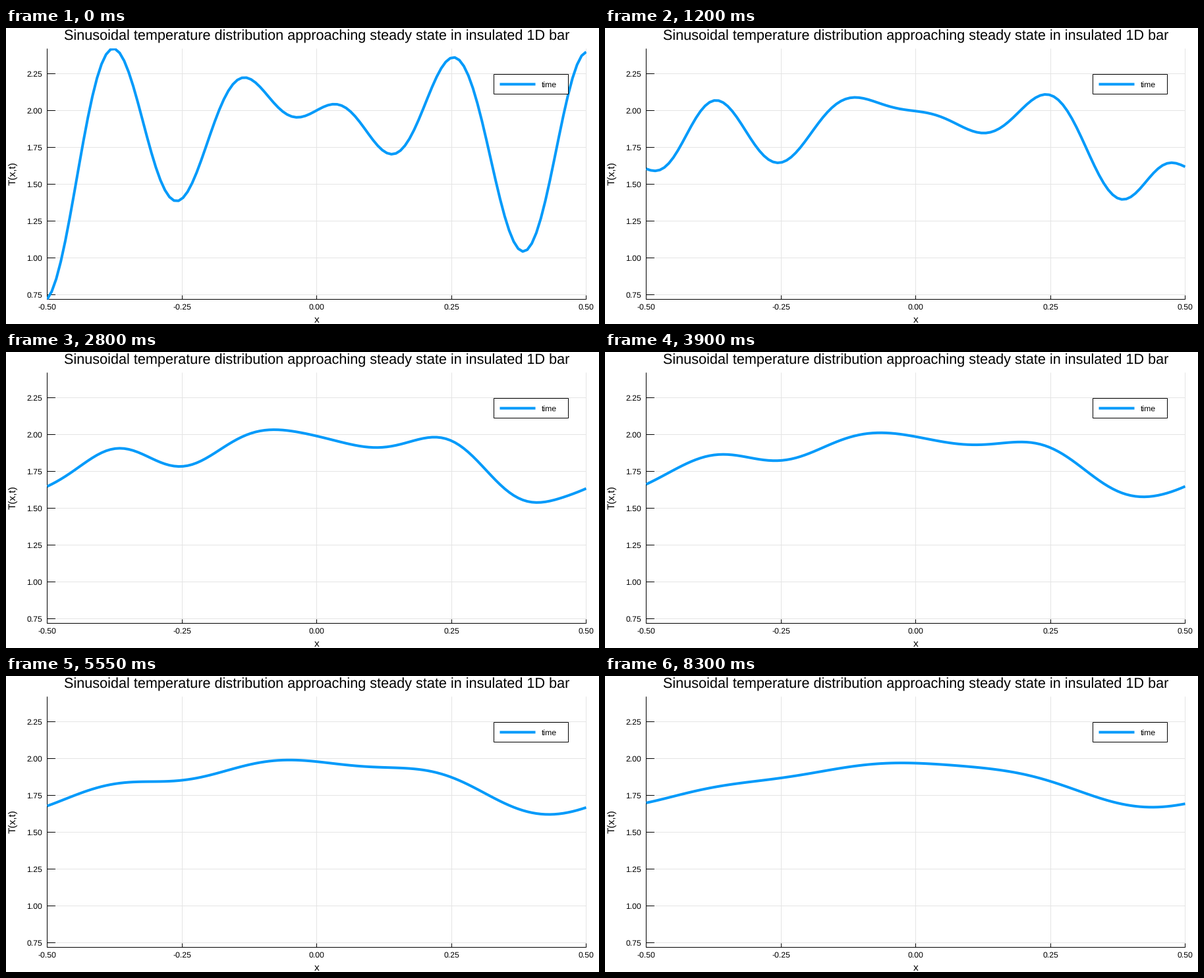
Write a matplotlib script that moves like this. It is 900 px wide and 450 px high and loops after 8.35 s.

```python
import matplotlib.pyplot as plt
import numpy as np
from matplotlib.animation import FuncAnimation
from matplotlib.patches import Rectangle

W, H = 900, 450
LEFT, RIGHT, TOP, BOTTOM = 62.5, 880.5, 31.4, 412.2
FRAMES, INTERVAL = 167, 50
BLUE = "#009afa"
N = 120              # grid points on the bar
STEP = 5e-5          # diffusivity times time per frame

plt.rcParams.update({
    "font.family": "Liberation Sans",
    "text.hinting": "none",
    "toolbar": "None",
})

# Periodic heat equation, solved mode by mode
x = np.linspace(-0.5, 0.5, N)
dx = x[1] - x[0]
start = 2 * np.exp(-x**2) + np.sin(2 * x) * np.cos(25 * x)
modes = np.fft.rfft(start)
rates = (2 * np.sin(np.pi * np.arange(len(modes)) / N) / dx) ** 2


def temperature(frame):
    return np.fft.irfft(modes * np.exp(-rates * STEP * frame), N)


def to_x(v):
    return LEFT + (v + 0.5) * (RIGHT - LEFT)


def to_y(v):
    return 69.3 + (2.25 - v) * 223.87


def crisp(v):
    return np.floor(v) + 0.5


fig = plt.figure(figsize=(W / 72, H / 72), dpi=72, facecolor="white")
ax = fig.add_axes([0, 0, 1, 1])
ax.set_xlim(0, W)
ax.set_ylim(H, 0)
ax.axis("off")


def rule(x0, y0, x1, y1, color="black", width=1, z=2):
    ax.plot([x0, x1], [y0, y1], color=color, lw=width, zorder=z,
            solid_capstyle="butt", snap=False)


def label(px, py, text, size, ha="center", **kw):
    ax.text(px, py, text, fontsize=size, ha=ha, va="baseline", zorder=6, **kw)


base = crisp(BOTTOM)
for v in np.arange(-0.5, 0.51, 0.25):
    px = crisp(to_x(v))
    rule(px, TOP, px, base, "#e4e4e4", z=1)
    rule(px, base, px, base - 6)
    label(to_x(v), 428.2, f"{v:.2f}", 12.3, parse_math=False)

for v in np.arange(0.75, 2.3, 0.25):
    py = crisp(to_y(v))
    rule(LEFT, py, RIGHT, py, "#e4e4e4", z=1)
    rule(LEFT, py, LEFT + 12.5, py)
    label(55.2, to_y(v) + 4.6, f"{v:.2f}", 12.3, ha="right")

rule(LEFT, TOP, LEFT, base + 0.5)
rule(LEFT - 0.5, base, RIGHT + 0.5, base)

label(471.5, 18.2, "Sinusoidal temperature distribution approaching "
      "steady state in insulated 1D bar", 21.63)
label(471.7, 448, "x", 15.4)
label(15, 221, "T(x,t)", 15.4, rotation=90, rotation_mode="anchor")

curve, = ax.plot(to_x(x), to_y(start), color=BLUE, lw=4, zorder=3,
                 solid_joinstyle="round", solid_capstyle="butt")
curve.set_clip_path(Rectangle((62, 31), 819, 382, transform=ax.transData))

ax.add_patch(Rectangle((740.5, 70.5), 113, 30, fc="white", ec="black",
                       lw=1, zorder=4, snap=False))
rule(749.5, 85.5, 803.5, 85.5, BLUE, 4, z=5)
label(812.7, 90, "time", 12.3, ha="left")


def update(frame):
    curve.set_ydata(to_y(temperature(frame)))
    return curve,


anim = FuncAnimation(fig, update, frames=FRAMES, interval=INTERVAL,
                     repeat=True, repeat_delay=0, blit=False)
plt.show()
```
